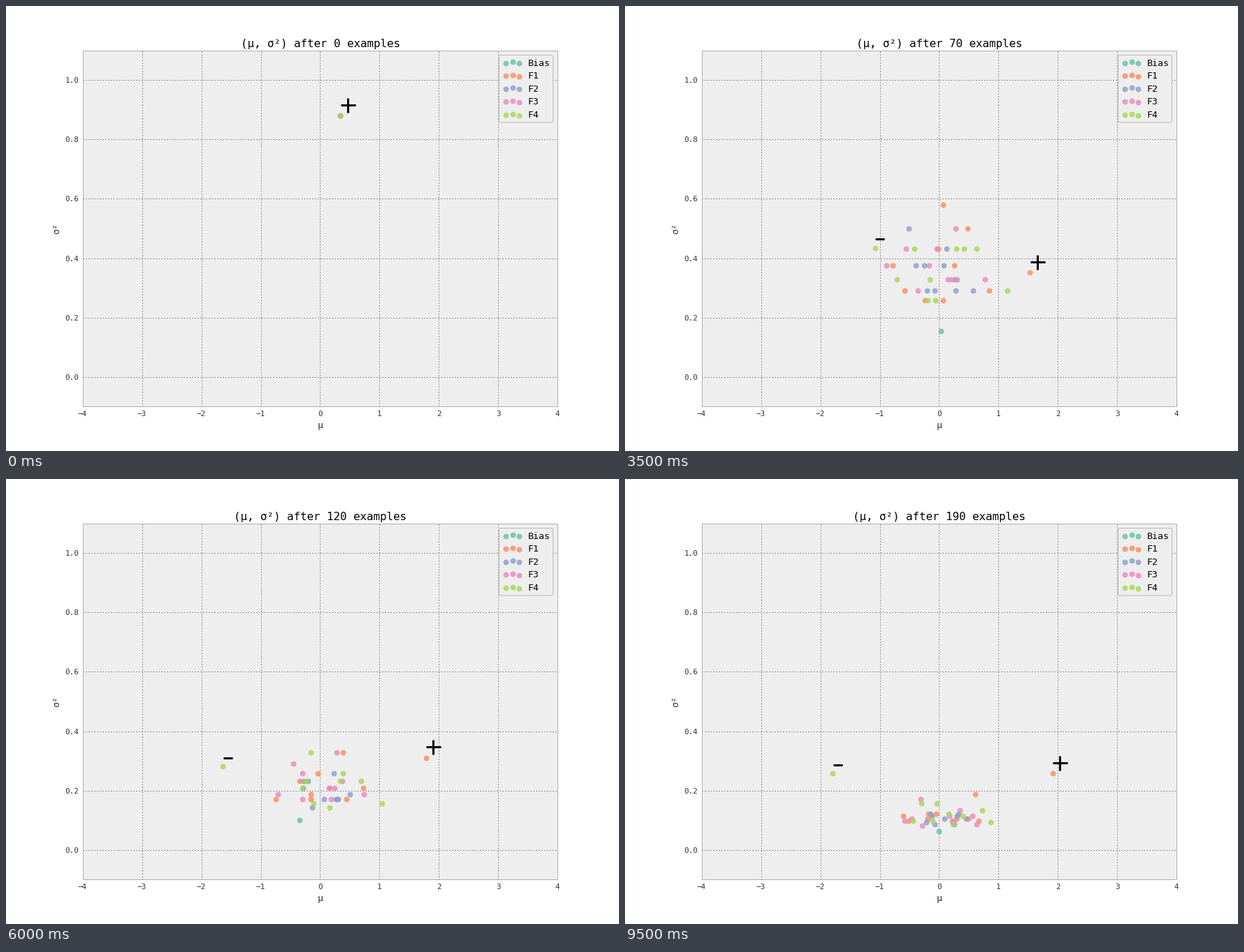
Animation of 877 by 638 pixels, one loop 10000 ms. Source, as a matplotlib script:

```python
import numpy as np
import matplotlib.pyplot as plt
from matplotlib.animation import FuncAnimation
from matplotlib.patches import FancyBboxPatch

W, H, DPI = 877, 638, 72
STEPS, INTERVAL = 20, 500
FIRST_MEAN = 0.34
INK = "#333333"

plt.rcParams.update({"font.family": "DejaVu Sans Mono", "font.size": 11})

COLORS = {"Bias": "#66c2a5", "F1": "#fc8d62", "F2": "#8da0cb",
          "F3": "#e78ac3", "F4": "#a6d854"}


def guided(*keys):
    """Path through (step, mean, variance) keys, linear in the precision."""
    steps, means, variances = np.array(keys).T
    t = np.arange(STEPS)
    path = np.column_stack([np.interp(t, steps, means),
                            1 / np.interp(t, steps, 1 / variances)])
    path[t < steps[0]] = np.nan
    return path


def variance(count):
    """Uncertainty left in a weight after a number of updates."""
    return 1 / (1.06 + 0.074 * count ** 1.58)


def learn(rng, size, seen_at_start):
    """Weights updated at random times, drifting less as they grow certain."""
    goal = rng.normal(0, 0.35, size)
    side = rng.choice([-1, 1], size)
    mean, count = np.zeros(size), np.zeros(size)
    if seen_at_start:
        mean[0], count[0] = FIRST_MEAN, 1
    paths = np.full((size, STEPS, 2), np.nan)
    for step in range(STEPS):
        for _ in range(2 if step else 0):
            hit = rng.random(size) < 0.5
            drift = 0.2 * (goal - mean) + rng.normal(0, 0.33, size)
            move = np.where(count == 0, FIRST_MEAN * side, variance(count) * drift)
            mean += hit * move
            count += hit
        seen = count > 0
        paths[seen, step] = np.column_stack([mean, variance(count)])[seen]
    return paths


BIAS = guided((0, .34, .88), (4, .12, .215), (7, .03, .154),
              (12, -.35, .100), (16, .16, .071), (19, -.01, .063))
STRONGEST = guided((0, .34, .88), (4, 1.12, .468), (7, 1.53, .351),
                   (9, 1.55, .344), (12, 1.78, .309), (19, 1.91, .257))
WEAKEST = guided((1, -.45, .83), (4, -1.29, .530), (7, -1.08, .435),
                 (9, -1.29, .379), (12, -1.64, .281), (16, -1.79, .258))

rng = np.random.default_rng(12)
TRACKS = {
    "Bias": BIAS[None],
    "F1": np.concatenate([STRONGEST[None], learn(rng, 9, False)]),
    "F2": learn(rng, 10, True),
    "F3": learn(rng, 10, True),
    "F4": np.concatenate([WEAKEST[None], learn(rng, 9, True)]),
}

fig = plt.figure(figsize=(W / DPI, H / DPI), dpi=DPI, facecolor="white")
ax = fig.add_axes([0.125, 0.1, 0.775, 0.8], facecolor="#eeeeee")
ax.set(xlim=(-4, 4), ylim=(-0.1, 1.1), xticks=range(-4, 5),
       yticks=np.arange(6) / 5)
ax.set_axisbelow(True)
ax.grid(color="black", lw=0.8, ls=(0, (1.25, 3.75)))
ax.tick_params(length=0, pad=5.5, labelcolor=INK)
ax.spines[:].set(color="#b0b0b0", linewidth=1)

# overlay in pixel units, origin at the top left
page = fig.add_axes([0, 0, 1, 1])
page.set(xlim=(0, W), ylim=(H, 0))
page.axis("off")
title = page.text(450, 59, "", size=15.84, ha="center", va="baseline")
page.text(449.5, 602, "μ", size=13.2, ha="center", va="center", color=INK)
page.text(72.5, 319, "σ²", size=13.2, ha="center", va="center",
          rotation=90, color=INK)


def dots(axes, x, y, color):
    return axes.scatter(x, y, s=47, color=color, edgecolor=color, lw=1,
                        alpha=0.8, zorder=3)


def draw_legend():
    page.add_patch(FancyBboxPatch((705.5, 70.5), 77, 96.5, fc="#eeeeee",
                                  ec="#bcbcbc", lw=1, zorder=2,
                                  boxstyle="round,pad=0,rounding_size=2.6"))
    for row, (name, color) in enumerate(COLORS.items()):
        y = 81 + 18.6 * row
        dots(page, [715, 724.5, 733.8], [y + 0.5, y - 0.9, y + 1.2], color)
        page.text(747, y + 4.6, name, size=13.2, va="baseline", zorder=3)


draw_legend()
clouds = {name: dots(ax, [], [], color) for name, color in COLORS.items()}
plus, = ax.plot([], [], "k+", ms=21, mew=3, zorder=4)
minus, = ax.plot([], [], "k_", ms=13, mew=3, zorder=4)


def place(mark, point, dx, dy):
    """Put a mark dx, dy pixels right of and above a point."""
    mark.set_data([point[0] + dx * 8 / (0.775 * W)],
                  [point[1] + dy * 1.2 / (0.8 * H)])


def update(step):
    title.set_text(f"(μ, σ²) after {10 * step} examples")
    for name, cloud in clouds.items():
        points = TRACKS[name][:, step]
        cloud.set_offsets(points[np.isfinite(points[:, 0])])
    place(plus, STRONGEST[step], 10.3, 15.8)
    place(minus, WEAKEST[step], 6.5, 12.4)
    return [title, plus, minus, *clouds.values()]


anim = FuncAnimation(fig, update, frames=STEPS, interval=INTERVAL,
                     repeat=True, repeat_delay=0, blit=False)
plt.show()
```
